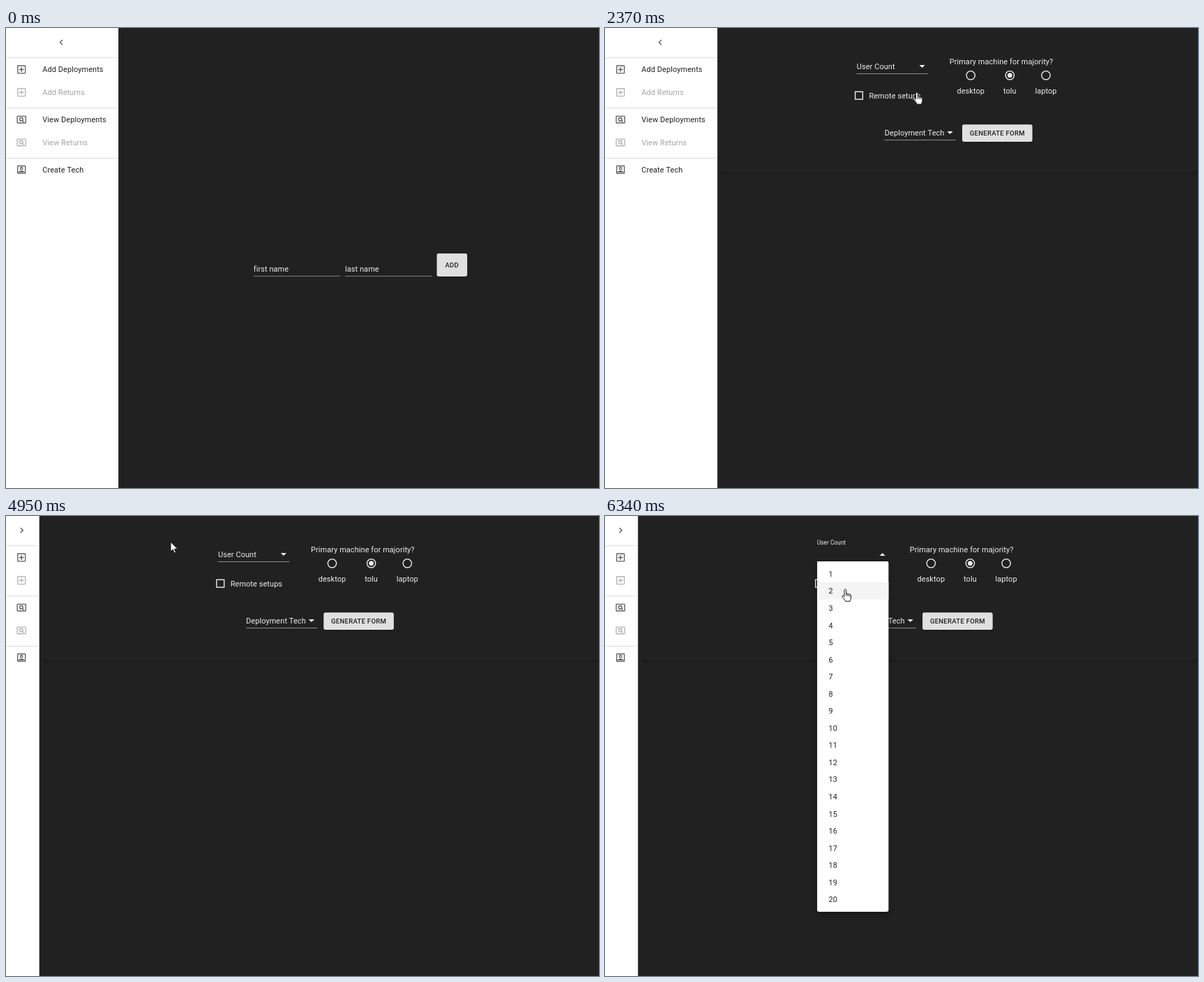
An HTML page with a canvas for the animation above (8000 ms loop, 850 px wide and 659 px high).

```html
<!DOCTYPE html>
<html lang="en">
<head>
<meta charset="utf-8">
<title>Deployment form</title>
<style>
html, body { margin: 0; width: 100%; height: 100%; overflow: hidden; background: #212121; }
canvas { display: block; width: 100%; height: 100%; }
</style>
</head>
<body>
<canvas id="stage" width="850" height="659"></canvas>
<script>
const ctx = document.getElementById('stage').getContext('2d');
const LOOP = 8000, STEP = 77.5, PRESS = 145;
const UNIT = 0.682, OPEN = 161.3, SHUT = 47.5;
const LIGHT = '#eee', DARK = 'rgba(0,0,0,.87)', FAINT = 'rgba(0,0,0,.36)';
const PALE = '#e0e0e0', HOVER = '#f4f4f4';
const ITEM = 48 * UNIT, ROW = 36 * UNIT, PAD = 8 * UNIT;
const MENU = { x: 361, y: 65, w: 150 * UNIT, h: 20 * ROW + 2 * PAD };

// Presses: page change, drawer toggle, select
const PAGE = 1600, TOGGLE = 4630, SELECT = 5320;

// Pointer moves: start, end, resting place
const START = { x: 726, y: 631 };
const moves = [
  [70, 770, 72, 84], [1010, 1140, 73.5, 57.5], [1600, 2370, 447, 92],
  [2450, 2520, 459, 84], [2840, 3240, 395, 58], [4170, 4630, 86, 17],
  [4780, 5170, 386, 57], [5320, 6110, 355, 105], [6190, 6340, 344.5, 105]
];

const handShape = new Path2D('M-1.5 10.3V1.5a1.4 1.4 0 0 1 2.8 0V6.5c.5-1 2.2-.8 2.4.5' +
  'c.6-.8 2-.6 2.3.6c.7-.6 2-.2 2 1.2V12c0 2-1 3-1.5 5.2H.2C-.5 15-3 12.5-4.3 10.8' +
  'c-.9-1.3.8-2.3 1.7-1.3z');
const knuckles = new Path2D('M1.3 6.5V9.5M3.7 7V9.8M6 7.6V10');
const arrowShape = new Path2D('M0 0V14L3.2 11 5.3 16 7.5 15 5.4 10.3H10z');

const clamp = v => Math.min(1, Math.max(0, v));
const mix = (a, b, p) => a + (b - a) * p;
const within = (v, lo, hi) => v > lo && v < hi;
const easeInOut = p => p < 0.5 ? 4 * p ** 3 : 1 - 4 * (1 - p) ** 3;

function bezier(x1, y1, x2, y2, x) {
  x = clamp(x);
  const at = (a, b, s) => 3 * a * s * (1 - s) ** 2 + 3 * b * s * s * (1 - s) + s ** 3;
  let lo = 0, hi = 1;
  for (let i = 0; i < 24; i++) {
    const s = (lo + hi) / 2;
    if (at(x1, x2, s) < x) lo = s; else hi = s;
  }
  return at(y1, y2, (lo + hi) / 2);
}

// The screen refreshes in steps, and only while the pointer moves
function sample(time) {
  let t = 0, { x, y } = START;
  for (const [a, b, toX, toY] of moves) {
    if (time < a) break;
    const n = Math.round((b - a) / STEP), dt = (b - a) / n;
    const k = Math.min(n, Math.floor((time - a) / dt + 1e-6));
    const p = easeInOut((k + 1) / (n + 1));
    t = a + k * dt;
    x = mix(x, toX, p);
    y = mix(y, toY, p);
  }
  return { t, x, y };
}

function text(str, x, y, color, align = 'left', size = 16, weight = 400) {
  const px = size * UNIT;
  ctx.font = `${weight} ${px}px Roboto, sans-serif`;
  ctx.letterSpacing = px * (weight > 400 ? 0.02857 : 0.00938) + 'px';
  ctx.textAlign = align;
  ctx.fillStyle = color;
  ctx.fillText(str, x, y);
}

function box(x, y, w, h, color, r = 0) {
  ctx.fillStyle = color;
  ctx.beginPath();
  ctx.roundRect(x, y, w, h, r);
  ctx.fill();
}

function disc(x, y, r, color) {
  ctx.fillStyle = color;
  ctx.beginPath();
  ctx.arc(x, y, r, 0, Math.PI * 2);
  ctx.fill();
}

function raised(x, y, w, h, color, blur) {
  ctx.save();
  ctx.shadowColor = 'rgba(0,0,0,.3)';
  ctx.shadowBlur = blur;
  ctx.shadowOffsetY = blur / 2;
  box(x, y, w, h, color, 2.7);
  ctx.restore();
}

function button(str, x, y, w, h) {
  raised(x, y, w, h, PALE, 2);
  text(str, x + w / 2, y + h / 2 + 3.4, DARK, 'center', 14, 500);
}

// Line icons on a 24-unit grid
function icon(kind, cx, cy, color) {
  ctx.save();
  ctx.translate(cx, cy);
  ctx.scale(UNIT, UNIT);
  ctx.strokeStyle = color;
  ctx.lineWidth = 2;
  ctx.beginPath();
  if (kind === 'left' || kind === 'right') {
    const d = kind === 'left' ? 2.6 : -2.6;
    ctx.moveTo(d, -5.3); ctx.lineTo(-d, 0); ctx.lineTo(d, 5.3);
  } else if (kind === 'View') {
    ctx.roundRect(-9, -7, 18, 14, 1);
    ctx.moveTo(3, -0.5); ctx.arc(-0.5, -0.5, 3.5, 0, Math.PI * 2);
    ctx.moveTo(2, 2); ctx.lineTo(5, 5);
  } else {
    ctx.roundRect(-8, -8, 16, 16, 1);
    if (kind === 'Add') {
      ctx.moveTo(0, -5); ctx.lineTo(0, 5);
      ctx.moveTo(-5, 0); ctx.lineTo(5, 0);
    } else {
      ctx.moveTo(2.5, -2.5); ctx.arc(0, -2.5, 2.5, 0, Math.PI * 2);
      ctx.moveTo(-5, 5); ctx.quadraticCurveTo(0, 1, 5, 5); ctx.closePath();
    }
  }
  ctx.stroke();
  ctx.restore();
}

function drawer(cur, width) {
  const folding = cur.t >= TOGGLE + PRESS, cx = width / 2 - 1.4;
  ctx.save();
  ctx.beginPath();
  ctx.rect(0, 0, width, 659);
  ctx.clip();
  box(0, 0, width, 659, '#fff');
  if (folding && Math.hypot(cur.x - cx, cur.y - 20.5) < 19) disc(cx, 20.5, 16.4, '#f5f5f5');
  icon(folding ? 'right' : 'left', cx, 20.5, '#555');

  let y = 42.3;
  for (const [kind, ...names] of [['Add', 'Deployments', 'Returns'],
    ['View', 'Deployments', 'Returns'], ['Create', 'Tech']]) {
    box(0, Math.round(y), width, 1, PALE);
    y += 0.8;
    for (const name of names) {
      const on = name !== 'Returns', mid = y + ITEM / 2;
      const hot = on && cur.t >= PAGE && cur.x < width && within(cur.y, y, y + ITEM);
      if (hot) box(0, y, width, ITEM, HOVER);
      icon(kind, 22.2, mid, on ? '#616161' : '#b5b5b5');
      text(kind + ' ' + name, 52.3, mid + 3.9, on ? DARK : FAINT);
      y += ITEM;
    }
    y += PAD;
  }
  ctx.restore();
}

function nameForm() {
  ['first name', 'last name'].forEach((label, i) => {
    const x = 354.8 + i * 131.2;
    text(label, x, 349, LIGHT);
    box(x, 355, 124.5, 1, '#7e7e7e');
  });
  button('ADD', 617.5, 323, 43.6, 33);
}

function triangle(x, y, up) {
  const d = up ? -2 : 2;
  ctx.fillStyle = LIGHT;
  ctx.beginPath();
  ctx.moveTo(x - 4.1, y - d);
  ctx.lineTo(x + 4.1, y - d);
  ctx.lineTo(x, y + d);
  ctx.fill();
}

function select(label, x, y, hot, shrink = 0, open = false) {
  text(label, x, mix(y, y - 17.6, shrink), LIGHT, 'left', mix(16, 12, shrink));
  box(x, y + 6, 102, 1, hot ? '#e6e6e6' : '#8c8c8c');
  triangle(x + 93.8, y - 4.1, open);
}

function menu(age, cur, dx) {
  const ease = p => bezier(0.4, 0, 0.2, 1, p), grow = ease(age / 267);
  const hot = Math.floor((cur.y + 1 - MENU.y - PAD) / ROW);
  ctx.save();
  ctx.globalAlpha = ease(age / 400);
  ctx.translate(MENU.x, MENU.y);
  ctx.scale(mix(0.75, 1, grow), mix(0.5625, 1, grow));
  raised(0, 0, MENU.w, MENU.h, '#fff', 8);
  for (let i = 0; i < 20; i++) {
    const y = PAD + i * ROW;
    if (i === hot && cur.x > MENU.x + dx) box(0, y, MENU.w, ROW, HOVER);
    text(String(i + 1), 24 * UNIT, y + 16.4, DARK);
  }
  ctx.restore();
}

function setupForm(cur, width) {
  const dx = (width - OPEN) / 2, x = cur.x - dx, age = cur.t - SELECT - 41;
  box(width + 6, 207.5, 842 - width, 1, '#151515');
  ctx.save();
  ctx.translate(dx, 0);

  const hot = age > 0 || (within(x, 361, 463) && within(cur.y, 44, 66));
  select('User Count', 360.8, 59, hot, bezier(0, 0, 0.2, 1, (age - 8) / 200), age > 0);

  ctx.strokeStyle = LIGHT;
  ctx.lineWidth = 1.4;
  ctx.strokeRect(358.6, 91.3, 10.8, 10.8);
  text('Remote setups', 378.4, 100.6, LIGHT);

  text('Primary machine for majority?', 568, 52, LIGHT, 'center');
  for (const [label, cx] of [['desktop', 524.2], ['tolu', 580.3], ['laptop', 632]]) {
    ctx.beginPath();
    ctx.arc(cx, 67.8, 6.2, 0, Math.PI * 2);
    ctx.stroke();
    text(label, cx, 94, LIGHT, 'center');
  }
  disc(580.3, 67.8, 3.4, LIGHT);

  select('Deployment Tech', 400.8, 154, false);
  button('GENERATE FORM', 512, 138.3, 100.6, 24.6);
  if (age > 0) menu(age, cur, dx);
  ctx.restore();
}

function clickable({ t, x, y }, width) {
  if (x < width) return y < 76;
  if (t < PAGE + PRESS) return false;
  if (t >= SELECT) return true;
  const left = x - (width - OPEN) / 2;
  return within(left, 358, 463) && (within(y, 44, 66) || within(y, 88, 104));
}

function drawPointer(cur, width) {
  const hand = clickable(cur, width), shape = hand ? handShape : arrowShape;
  ctx.save();
  ctx.translate(cur.x, cur.y);
  ctx.fillStyle = '#fff';
  ctx.strokeStyle = '#111';
  ctx.lineWidth = 1;
  ctx.lineJoin = 'round';
  ctx.fill(shape);
  ctx.stroke(shape);
  if (hand) ctx.stroke(knuckles);
  const pressed = [PAGE, TOGGLE, SELECT].some(c => cur.t >= c - 1 && cur.t < c + PRESS);
  if (pressed) disc(-0.3, 1.2, 11.5, 'rgba(252,240,0,.54)');
  ctx.restore();
}

function draw() {
  const cur = sample(performance.now() % LOOP);
  const width = mix(OPEN, SHUT, bezier(0.4, 0, 0.6, 1, (cur.t - TOGGLE - 118.5) / 195));
  box(0, 0, 850, 659, '#212121');
  if (cur.t < PAGE + PRESS) nameForm(); else setupForm(cur, width);
  drawer(cur, width);
  if (cur.t > 0) drawPointer(cur, width);
  requestAnimationFrame(draw);
}
draw();
</script>
</body>
</html>
```
